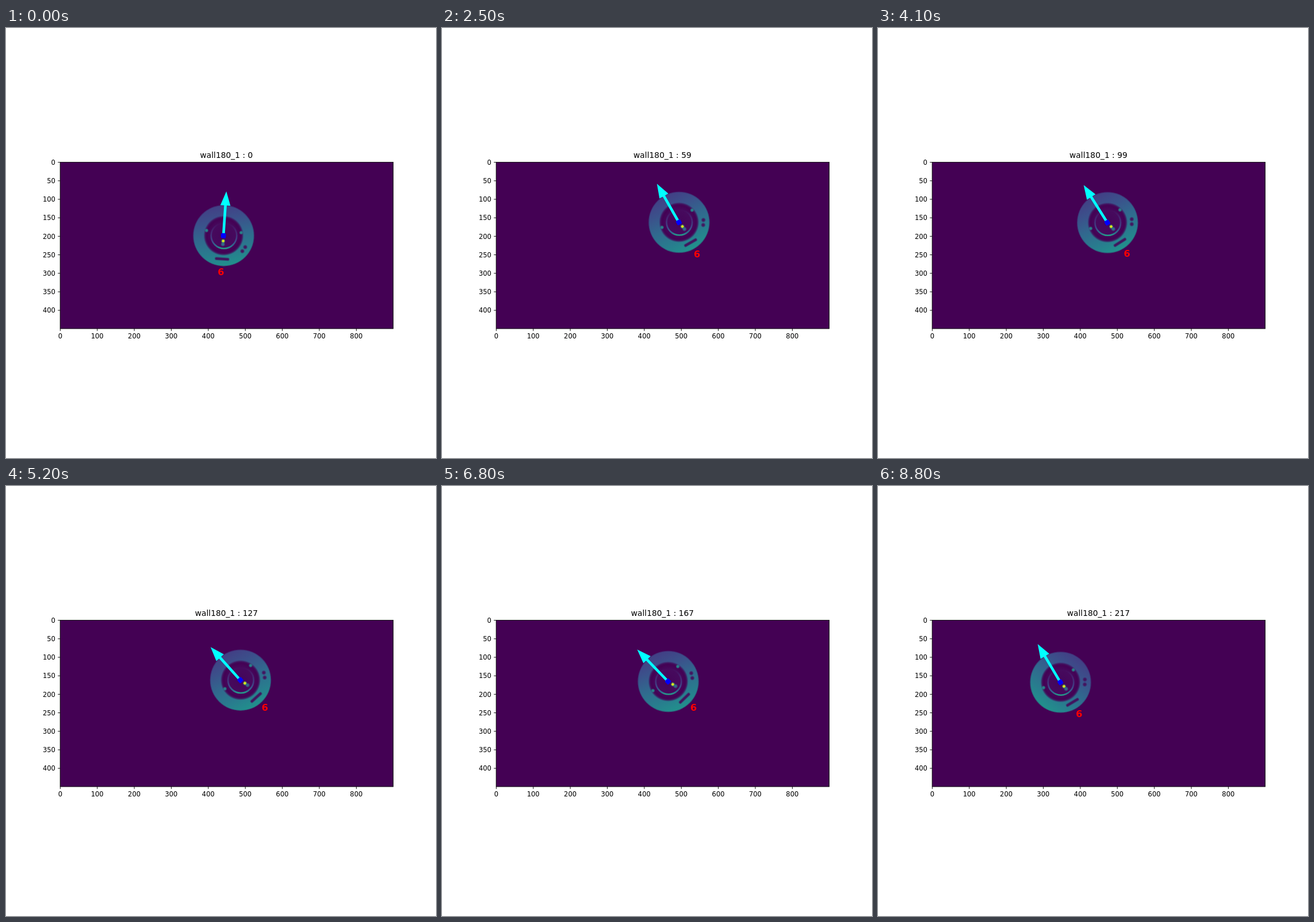
These frames come from a looping animation (748 by 748 pixels, 8900 ms). An HTML page with a canvas:

```html
<!DOCTYPE html>
<html lang="en">
<head>
<meta charset="utf-8">
<title>Tracked disc</title>
<style>
html, body { margin: 0; width: 100%; height: 100%; overflow: hidden; background: #fff; }
canvas { display: block; }
</style>
</head>
<body>
<canvas id="stage" width="748" height="748"></canvas>
<script>
const ctx = document.getElementById('stage').getContext('2d');
const TAU = Math.PI * 2;
const STEP = 100, STEPS = 89;
const BG = '#440154';
const BOX = { x: 94.2, y: 233.4, w: 579.4, h: 289.6 };
const SCALE = BOX.w / 900;
const PT = 748 / 648; // a nine inch figure, 72 points to the inch

// step, centre x, centre y, heading in degrees clockwise from up
const KEYS = [
  [0, 378.6, 361.2, 3.8],
  [15, 373, 338.8, 15.6],
  [25, 412.4, 338, -29.6],
  [41, 399.3, 338.5, -32.2],
  [52, 408, 337.7, -42],
  [68, 393.6, 340, -44],
  [88, 317.6, 341.4, -30.7]
];

// Monotone cubic through one column of the keys.
function track(col, n) {
  let i = 0;
  while (i < KEYS.length - 2 && n >= KEYS[i + 1][0]) i++;
  const slope = k => (KEYS[k + 1][col] - KEYS[k][col]) / (KEYS[k + 1][0] - KEYS[k][0]);
  const tangent = k => {
    if (k === 0) return slope(0);
    if (k === KEYS.length - 1) return slope(k - 1);
    const a = slope(k - 1), b = slope(k);
    return a * b <= 0 ? 0 : 2 * a * b / (a + b);
  };
  const [n0, n1] = [KEYS[i][0], KEYS[i + 1][0]];
  const h = n1 - n0, u = (n - n0) / h, v = 1 - u;
  return KEYS[i][col] * (1 + 2 * u) * v * v + tangent(i) * h * u * v * v
    + KEYS[i + 1][col] * u * u * (3 - 2 * u) - tangent(i + 1) * h * u * u * v;
}

function counter(n) {
  return n < 15 ? Math.round(n * 34 / 15) : Math.round(2.5 * n - 3.5);
}

function circle(x, y, r, fill) {
  ctx.fillStyle = fill;
  ctx.beginPath();
  ctx.arc(x, y, r, 0, TAU);
  ctx.fill();
}

function gradient(g, stops) {
  stops.forEach(([at, color]) => g.addColorStop(at, color));
  return g;
}

function softDot(x, y, r, rgb) {
  circle(x, y, r, gradient(ctx.createRadialGradient(x, y, 0, x, y, r), [
    [0, `rgba(${rgb},1)`], [0.45, `rgba(${rgb},.85)`], [1, `rgba(${rgb},0)`]
  ]));
}

function text(str, x, y, points, align, color = '#000', weight = 'normal') {
  ctx.font = `${weight} ${points * PT}px "DejaVu Sans", sans-serif`;
  ctx.textAlign = align;
  ctx.fillStyle = color;
  ctx.fillText(str, x, y);
}

function line(x0, y0, x1, y1) {
  ctx.beginPath();
  ctx.moveTo(x0, y0);
  ctx.lineTo(x1, y1);
  ctx.stroke();
}

function drawAxes(title) {
  const bottom = BOX.y + BOX.h;
  ctx.strokeStyle = '#000';
  ctx.lineCap = 'butt';
  ctx.lineWidth = 0.8 * PT;
  ctx.strokeRect(BOX.x, BOX.y, BOX.w, BOX.h);
  for (let v = 0; v < 900; v += 100) {
    const x = BOX.x + v * SCALE + 0.2;
    line(x, bottom, x, bottom + 3.5 * PT);
    text(v, x - 0.1, 540.2, 10, 'center');
  }
  for (let v = 0; v < 450; v += 50) {
    const y = BOX.y + v * SCALE + 0.2;
    line(BOX.x - 3.5 * PT, y, BOX.x, y);
    text(v, 85.9, y + 4.2, 10, 'right');
  }
  text(title, 383.4, 226, 12, 'center');
}

// Light stays fixed to the scene; its side depends on where the disc is.
function drawRing(x) {
  const tilt = Math.max(-0.7, Math.min(0.5, (x - 365) / 70));
  const len = Math.hypot(tilt, 1);
  const lx = 53 * tilt / len, ly = 53 / len;
  circle(0, 0, 53.2, gradient(ctx.createLinearGradient(-lx, -ly, lx, ly), [
    [0, '#423f85'], [0.25, '#3b518b'], [0.5, '#31688e'], [0.78, '#287d8e'], [1, '#21918c']
  ]));
  ctx.strokeStyle = 'rgba(68,1,84,.35)';
  ctx.lineWidth = 1.5;
  ctx.beginPath();
  ctx.arc(0, 0, 52.7, 0, TAU);
  ctx.stroke();

  circle(0, 0, 35, gradient(ctx.createRadialGradient(0, 0, 0, 0, 0, 35), [
    [0, '#450559'], [0.6, '#460a5d'], [0.84, BG],
    [0.91, 'rgba(68,1,84,.85)'], [1, 'rgba(68,1,84,0)']
  ]));
  ctx.strokeStyle = gradient(ctx.createLinearGradient(0, -22, 0, 23), [
    [0, 'rgba(71,45,123,0)'], [0.3, 'rgba(70,50,126,.6)'], [0.7, '#3f4788'],
    [0.9, '#2c718e'], [1, '#22a386']
  ]);
  ctx.lineWidth = 2.6;
  ctx.beginPath();
  ctx.arc(0.5, 0, 22.3, 0, TAU);
  ctx.stroke();
}

function drawMarks(angle) {
  ctx.save();
  ctx.rotate(angle);
  ctx.lineCap = 'round';
  for (const [w, a] of [[6, 0.4], [3.8, 0.9]]) {
    ctx.strokeStyle = `rgba(68,14,92,${a})`;
    ctx.lineWidth = w;
    line(-10, 40.6, 10, 40.6);
  }
  softDot(38.8, 17.4, 4.4, '68,14,92');
  softDot(34.2, 24.8, 4.4, '68,14,92');
  softDot(-30.2, -7, 3.8, '36,140,140');
  softDot(30, -7.2, 3.8, '36,140,140');
  ctx.rotate(angle * 0.3);
  softDot(0, 15, 4.3, '48,115,142');
  softDot(0, 9.4, 4.2, '53,183,121');
  ctx.fillStyle = '#e4e419';
  ctx.fillRect(-2, 7.4, 4, 3.8);
  ctx.restore();
}

function drawArrow(angle) {
  ctx.save();
  ctx.rotate(angle);
  ctx.fillStyle = '#0ff';
  ctx.beginPath();
  [[-2.3, 0], [-2.3, -52.6], [-8.8, -52.6], [0, -77.2], [8.8, -52.6], [2.3, -52.6], [2.3, 0]]
    .forEach(([x, y]) => ctx.lineTo(x, y));
  ctx.fill();
  ctx.fillStyle = '#00f';
  ctx.beginPath();
  ctx.roundRect(-4.3, -4.3, 8.6, 8.6, 2);
  ctx.fill();
  ctx.restore();
}

function draw(n) {
  const x = track(1, n), y = track(2, n);
  const angle = track(3, n) * Math.PI / 180;
  ctx.fillStyle = '#fff';
  ctx.fillRect(0, 0, 748, 748);
  ctx.fillStyle = BG;
  ctx.fillRect(BOX.x, BOX.y, BOX.w, BOX.h);

  ctx.save();
  ctx.translate(x, y);
  drawRing(x);
  drawMarks(angle);
  ctx.translate(-0.4, 0);
  drawArrow(angle);
  text('6', -64 * Math.sin(angle), 64 * Math.cos(angle) + 5.3, 14, 'center', '#f00', 'bold');
  ctx.restore();

  drawAxes('wall180_1 : ' + counter(n));
}

function tick() {
  draw(Math.floor(performance.now() / STEP) % STEPS);
  requestAnimationFrame(tick);
}
tick();
</script>
</body>
</html>
```
